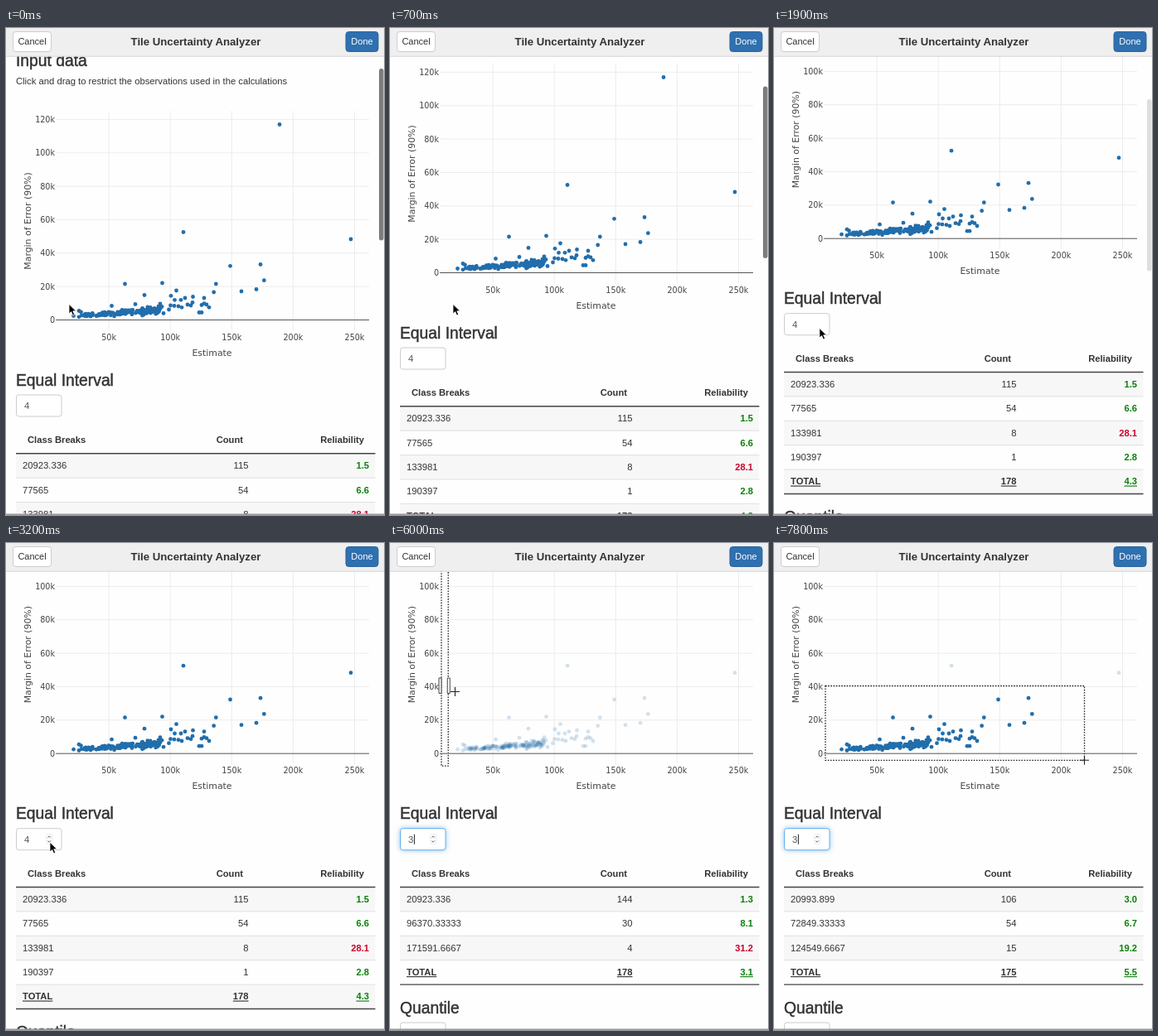
An HTML page for the animation above (8000 ms loop, 456 px wide and 588 px high).

```html
<!DOCTYPE html>
<html lang="en">
<head>
<meta charset="utf-8">
<title>Uncertainty tool</title>
<style>
html, body { margin: 0; height: 100%; overflow: hidden; background: #fefefe; }
svg { display: block; width: 456px; height: 588px; font: 11.25px "Liberation Sans", Arial, sans-serif; fill: #333; }
.h { font-size: 19.3px; stroke: #333; stroke-width: .45px; }
.b { font-weight: bold; font-size: 11.2px; }
.u { text-decoration: underline; }
.m { text-anchor: middle; }
.e { text-anchor: end; }
.plot text { font: 9.6px "DejaVu Sans", Verdana, sans-serif; fill: #444; }
.plot .axis { font-size: 10.9px; }
.box { fill: #fff; stroke: #ccc; }
.focus { stroke: #66afe9; filter: drop-shadow(0 0 3px rgba(102, 175, 233, .7)); }
</style>
</head>
<body>
<svg viewBox="0 0 456 588">
  <g id="page">
    <text class="h" x="12" y="46">Input data</text>
    <text x="12" y="68">Click and drag to restrict the observations used in the calculations</text>
    <g class="plot">
      <g id="axes"></g>
      <g id="points" fill="#226eac"></g>
    </g>
    <text class="h" x="12" y="431.5">Equal Interval</text>
    <rect id="field" class="box" x="12.5" y="443" width="54.5" height="26" rx="3"/>
    <text id="value" x="22" y="460" fill="#555"></text>
    <path id="caret" d="M29.4 450v12" stroke="#222"/>
    <g id="spinner">
      <rect x="48.5" y="449.5" width="7.5" height="12.5" rx="2.5" fill="#fff" stroke="#e2e2e2" stroke-width=".7"/>
      <path d="M50.5 454l1.7-1.9 1.7 1.9M50.5 457.7l1.7 1.9 1.7-1.9" fill="none" stroke="#555" stroke-width=".9"/>
    </g>
    <g id="table"></g>
    <g id="next">
      <text class="h" x="12" y="0">Quantile</text>
      <rect class="box" x="12.5" y="11.5" width="54.5" height="26" rx="3"/>
    </g>
  </g>
  <g id="selection" fill="none">
    <path id="outline" stroke="#fff" stroke-width="1.3"/>
    <path id="dots" stroke="#222" stroke-width="1.3" stroke-dasharray="1.6 1.6"/>
    <path id="handles" fill="#fff" stroke="#444"/>
  </g>
  <rect id="thumb" x="450" width="5.5" height="207.5" rx="2.7" fill="#7d7d7d"/>
  <rect width="456" height="34" fill="#efefef"/>
  <path d="M0 34.2h456" stroke="#d4d4d4"/>
  <rect class="box" x="8.5" y="4.5" width="46" height="24" rx="3.5"/>
  <text class="m" x="31.5" y="20.3" style="font-size:11px">Cancel</text>
  <text class="m b" x="229" y="21" style="font-size:13.2px">Tile Uncertainty Analyzer</text>
  <rect x="410" y="4.5" width="39" height="24" rx="3.5" fill="#2f70b0" stroke="#2a639c"/>
  <text class="m" x="429.5" y="20.3" fill="#fff" style="font-size:11px">Done</text>
  <path d="M0 587.3h456" stroke="#999" stroke-width="1.4"/>
  <path id="arrow" d="M0 0v11.6l2.7-2.5 1.9 4.4 2.1-.9-1.9-4.3h3.7z" stroke="#fff" stroke-width=".8" fill="#000"/>
  <path id="cross" d="M-5.5 0h11M0-5.5v11" stroke="#222" stroke-width="1.1"/>
</svg>
<script>
const el = id => document.getElementById(id);
const set = (id, attrs) => { for (const k in attrs) el(id).setAttribute(k, attrs[k]); };
const show = (id, on) => set(id, { visibility: on ? 'visible' : 'hidden' });
const text = (x, y, s, cls = '', extra = '') => `<text class="${cls}" x="${x}" y="${y}" ${extra}>${s}</text>`;
const line = (d, color, width = 1) => `<path d="${d}" stroke="${color}" stroke-width="${width}"/>`;

// Value at time t along keys [time, a, b, ...], linear in between
function along(keys, t) {
  const i = keys.findIndex(k => k[0] > t);
  if (i < 0) return keys.at(-1).slice(1);
  if (i === 0) return keys[0].slice(1);
  const p = keys[i - 1], q = keys[i], f = (t - p[0]) / (q[0] - p[0]);
  return p.slice(1).map((v, n) => v + (q[n + 1] - v) * f);
}

const LOOP = 8000, STEP = 100, ZERO = 352.5, BOTTOM = 365.5, TABLE_TOP = 513.8, ROW = 29.4;
const SCROLL = [[0, 0], [300, 20], [700, 57], [900, 80], [1100, 95], [1300, 97.8], [1600, 98.3]];
const FADE = [[1600, 1], [1900, .25], [2200, 0]];
const POINTER = [
  [0, 76, 333.5], [1300, 76, 333.5], [1850, 55, 362.5], [2300, 54, 362.5], [2600, 53.5, 363],
  [3000, 53.5, 363], [3600, 52, 358], [5150, 52, 358], [5300, 54, 310], [5600, 61, 178], [5800, 62, 172.5],
  [5900, 62, 172.5], [6000, 78.5, 179.5], [6300, 190, 215], [6600, 300, 244], [6900, 352, 256],
  [7400, 374.5, 262.3]
];

let axes = '';
for (let k = 50; k <= 250; k += 50) {
  const x = 50 + k * 1.482;
  axes += line(`M${x} 100V${BOTTOM}`, '#ececec') + text(x, 376.7, k + 'k', 'm');
}
for (let k = 0; k <= 120; k += 20) {
  const y = ZERO - k * 2.0175;
  axes += line(`M60 ${y}H438`, k ? '#ececec' : '#555') + text(59, y + 3.6, k ? k + 'k' : 0, 'e');
}
el('axes').innerHTML = axes + text(248.5, 395.7, 'Estimate', 'axis m') +
  text(0, 0, 'Margin of Error (90%)', 'axis m', 'transform="translate(30 233) rotate(-90)"');

const points = [
  [330, 116.5], [214, 246.5], [416, 255], [270.5, 287.3], [307, 285.5], [311.3, 304.7], [302, 315.5],
  [284, 318], [253.3, 309], [250.7, 319], [143.5, 309], [188.5, 308], [205.5, 317], [167, 322.5],
  [199, 323.3], [225.5, 324.5], [239, 326], [216, 326], [211, 328.3], [203.5, 328.3], [127.5, 335.5],
  [156, 333.5], [186, 333], [188, 336.5], [81.5, 347.5], [88, 341.5], [90.5, 343], [198.5, 335],
  [203, 335.5], [208, 336], [212, 337.3], [219, 334], [223, 335], [225, 331.5], [236, 334.5],
  [239, 332.7], [242, 334], [245, 337.3], [233, 343.5], [236, 343.5], [190, 344.5], [196.5, 340]
];
let seed = 11;
const random = () => (seed = seed * 16807 % 2147483647) / 2147483647;
while (points.length < 178) {
  const k = random();
  if (k < .25 && random() < .25) continue;
  const rise = (random() + random()) / 2 * (4 + 8 * k);
  points.push([88 + 98 * k, 349.5 - 3 * k - rise]);
}
el('points').innerHTML = points.map(([x, y]) => `<circle cx="${x}" cy="${y}" r="2.4"/>`).join('');
const circles = [...el('points').children];

const TABLES = [
  [[20923.336, 115, 1.5], [77565, 54, 6.6], [133981, 8, 28.1], [190397, 1, 2.8], ['TOTAL', 178, 4.3]],
  [[20923.336, 144, 1.3], ['96370.33333', 30, 8.1], ['171591.6667', 4, 31.2], ['TOTAL', 178, 3.1]],
  [[20993.899, 106, '3.0'], ['72849.33333', 54, 6.7], ['124549.6667', 15, 19.2], ['TOTAL', 175, 5.5]]
];
let shownTable = -1;
function drawTable(index) {
  if (index === shownTable) return;
  shownTable = index;
  const rows = TABLES[index], end = TABLE_TOP + rows.length * ROW;
  let out = text(26, 501.3, 'Class Breaks', 'b') + text(286, 501.3, 'Count', 'b e') + text(432, 501.3, 'Reliability', 'b e');
  rows.forEach(([name, count, score], i) => {
    const y = TABLE_TOP + i * ROW, base = y + 18.4, total = name === 'TOTAL' ? 'b u ' : '';
    if (i % 2 === 0) out += `<rect x="12" y="${y}" width="433.5" height="${ROW}" fill="#f7f7f7"/>`;
    if (i) out += line(`M12 ${y}H445.5`, '#ddd', .9);
    out += text(20, base, name, total) + text(292.5, base, count, total + 'e') +
      text(438, base, score, total + 'b e', `fill="${score > 20 ? '#c9002b' : '#0a800a'}"`);
  });
  el('table').innerHTML = out + line(`M12 ${TABLE_TOP}H445.5`, '#444', 1.5) + line(`M12 ${end}H445.5`, '#444', 1.3);
  set('next', { transform: `translate(0 ${end + 34.5})` });
}

function drawSelection(t, scroll) {
  const active = t >= 6000, band = t < 6100;
  show('selection', active);
  const [x0, y0] = along(POINTER, 5900), [x1, y1] = along(POINTER, t - 50);
  const top = band ? 100 - scroll : y0, bottom = band ? BOTTOM - scroll + 2 : y1;
  const d = `M${x0} ${top}H${x1}V${bottom}H${x0}Z`;
  set('outline', { d });
  set('dots', { d });
  set('handles', { d: band ? `M${x0} 163h-3v18.5h3zM${x1 - 1} 163h3v18.5h-3z` : '' });
  points.forEach(([x, y], i) => {
    const sy = y - scroll, inside = x >= x0 && x <= x1 && sy >= top && sy <= bottom;
    circles[i].setAttribute('opacity', !active || inside ? 1 : .2);
  });
}

function render(t) {
  const [scroll] = along(SCROLL, t), [x, y] = along(POINTER, t);
  const focused = t >= 3900, crosshair = t > 5200 && y < 268;
  set('page', { transform: `translate(0 ${-scroll})` });
  set('thumb', { y: 49 + scroll * .376, opacity: along(FADE, t)[0] });
  set('field', { class: focused ? 'box focus' : 'box' });
  el('value').textContent = focused ? 3 : 4;
  show('caret', focused && !(t >= 4300 && t < 4800) && !(t >= 5200 && t < 5600));
  show('spinner', t >= 3000);
  drawTable(t >= 7800 ? 2 : focused ? 1 : 0);
  drawSelection(t, scroll);
  show('arrow', !crosshair);
  show('cross', crosshair);
  for (const id of ['arrow', 'cross']) set(id, { transform: `translate(${x} ${y})` });
}

const start = performance.now();
function tick() {
  const t = (performance.now() - start) % LOOP;
  render(Math.floor(t / STEP) * STEP);
  requestAnimationFrame(tick);
}
tick();
</script>
</body>
</html>
```
